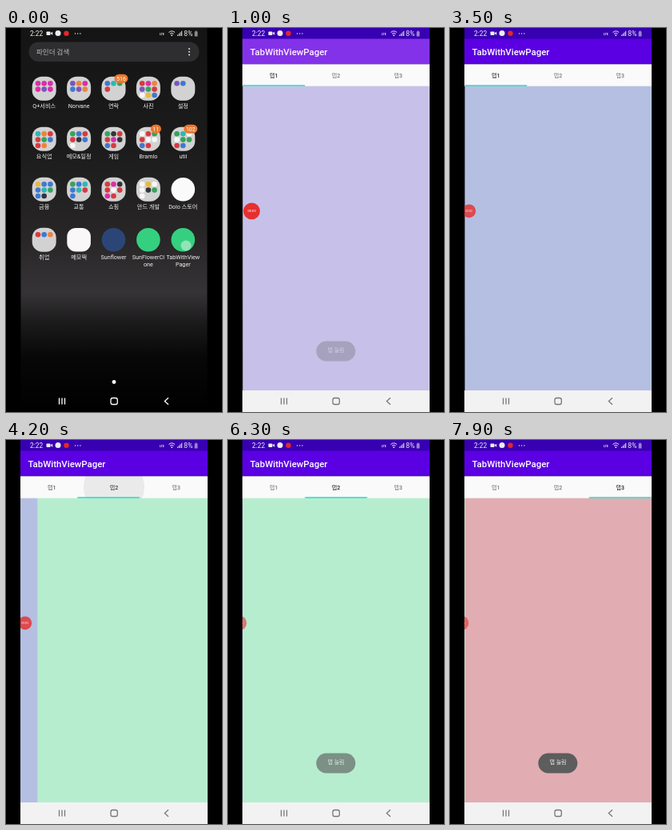
Write an HTML page that moves like this. It is 270 px wide and 480 px high and loops after 8 s.

```html
<!DOCTYPE html>
<html lang="ko">
<head>
<meta charset="utf-8">
<title>TabWithViewPager</title>
<style>
  html, body { margin: 0; width: 100%; height: 100%; overflow: hidden; background: #000; }
  svg { display: block; width: 100vw; height: 100vh; }
  text { font-family: Roboto, "Noto Sans CJK KR", "Noto Sans CJK", sans-serif; }
  .label { font-size: 7.2px; fill: #f2f2f2; text-anchor: middle; }
  .tab { font-size: 7px; font-weight: 500; text-anchor: middle; }
  .mid { text-anchor: middle; }
</style>
</head>
<body>
<svg id="stage" viewBox="0 0 270 480">
  <defs>
    <linearGradient id="wall" x2="0" y2="1">
      <stop offset="0" stop-color="#141415"/>
      <stop offset=".3" stop-color="#1c1b1b"/>
      <stop offset=".55" stop-color="#282627"/>
      <stop offset=".69" stop-color="#353335"/>
      <stop offset=".77" stop-color="#1b1a1b"/>
      <stop offset=".86" stop-color="#070707"/>
      <stop offset="1" stop-color="#000"/>
    </linearGradient>
    <clipPath id="screen"><rect x="18.5" width="233" height="480"/></clipPath>
    <clipPath id="tabRow"><rect x="18.5" y="45.5" width="233" height="27"/></clipPath>
  </defs>
  <rect width="270" height="480"/>
  <g clip-path="url(#screen)">
    <g id="home">
      <rect x="18" width="234" height="480" fill="url(#wall)"/>
      <rect x="28.5" y="17.5" width="213" height="24.5" rx="12.2" fill="#2e2e30"/>
      <text x="38" y="33" font-size="8.5" fill="#b8b8b8">파인더 검색</text>
      <g fill="#ddd"><circle cx="229" cy="26" r="1"/><circle cx="229" cy="29.7" r="1"/><circle cx="229" cy="33.4" r="1"/></g>
      <g id="icons"></g>
      <circle cx="135" cy="442.5" r="2.4" fill="#fff"/>
    </g>
    <circle id="touch" cx="225" cy="272" r="6.5" fill="#dff3e8" opacity="0"/>
    <g id="app" opacity="0">
      <rect x="18" width="234" height="14" fill="#3700b0"/>
      <rect x="18" y="13.5" width="234" height="32" fill="#5a00e2"/>
      <text x="27.5" y="34" font-size="11.45" font-weight="500" fill="#fff">TabWithViewPager</text>
      <g id="pages"></g>
      <rect id="blank" x="18" y="45" width="234" height="409" fill="#fafafa"/>
      <g id="tabs">
        <rect x="18" y="45.3" width="234" height="27.4" fill="#fafafa"/>
        <g id="ripples" clip-path="url(#tabRow)"></g>
        <g id="tabLabels"></g>
        <rect id="indicator" x="18.5" y="71.2" width="77.7" height="1.6" fill="#2cdcc8"/>
      </g>
      <path id="glow" d="M18 13.5h234v32h-234zM18 72.7h234V453h-234z" fill="#ffc8ff" opacity="0"/>
      <rect x="18" y="453" width="234" height="27" fill="#f2f2f2"/>
    </g>
    <g id="badge" opacity="0">
      <g id="badgeBody">
        <circle r="10.4" fill="#e5302f"/>
        <text id="clock" class="mid" y="1.5" font-size="4.2" fill="#fff">00:00</text>
      </g>
    </g>
    <g id="toast" opacity="0">
      <rect x="110.3" y="391.5" width="49" height="25" rx="12.4" fill="#5d5d5d"/>
      <text class="mid" x="135" y="405.3" font-size="7" fill="#eee">탭 눌림</text>
    </g>
    <g id="status" fill="#eee">
      <text x="30" y="10" font-size="8.4">2:22</text>
      <rect x="50.5" y="4.5" width="5" height="4.6" rx=".8"/><path d="M55.5 6.5l2.7-1.8v4.3z"/>
      <circle cx="65" cy="6.6" r="3.5"/>
      <circle cx="75.5" cy="6.7" r="3.2" fill="#e5262b"/>
      <circle cx="86.5" cy="7" r=".7"/><circle cx="89.7" cy="7" r=".7"/><circle cx="92.9" cy="7" r=".7"/>
      <text x="192" y="8.5" font-size="3.6" font-weight="700">LTE</text>
      <g fill="none" stroke="#eee"><path d="M203.5 5.5q3.8-3.3 7.6 0M205 7.3q2.3-1.9 4.6 0"/></g>
      <circle cx="207.3" cy="9.2" r=".9"/>
      <path d="M214 10V8.4h1.1V10zM215.7 10V6.9h1.1V10zM217.4 10V5.3h1.1V10zM219.1 10V3.8h1.1V10z" opacity=".85"/>
      <text x="222.3" y="10" font-size="8.6">8%</text>
      <path d="M235.7 4.4h1v-.8h1.8v.8h1V10.5h-3.8z" opacity=".55"/>
    </g>
    <g id="nav" fill="none" stroke="#fff" stroke-width="1.3">
      <path d="M66.5 462.5v8M70 462.5v8M73.5 462.5v8M203 462.3l-4.6 4.2 4.6 4.2"/>
      <rect x="131" y="462.5" width="8.3" height="8" rx="2.3"/>
    </g>
  </g>
</svg>
<script>
const LOOP = 8000, TAB = 77.7, PAGE = 233;
const $ = id => document.getElementById(id);

function add(parent, tag, attrs, text) {
  const node = document.createElementNS('http://www.w3.org/2000/svg', tag);
  for (const key in attrs) node.setAttribute(key, attrs[key]);
  if (text) node.textContent = text;
  return parent.appendChild(node);
}

// steps: [ms, value, easing towards the next step]
function play(node, prop, steps) {
  const full = [...steps];
  if (full[0][0] > 0) full.unshift([0, full[0][1]]);
  full.push([LOOP, full[full.length - 1][1]]);
  return node.animate(
    full.map(([ms, value, easing = 'linear']) => ({ offset: ms / LOOP, [prop]: value, easing })),
    { duration: LOOP, iterations: Infinity });
}

// Home screen: name, colours of the small icons by row
const dye = { r: '#d83a3f', o: '#f0823c', y: '#e9b93a', g: '#35a45c', t: '#2fb7b5', b: '#3f79d0',
              p: '#7a55c0', m: '#d92fa8', k: '#34353b', w: '#f7f7f7' };
const folders = [
  ['Q+서비스', 'mmm mpm'], ['Norvane', 'pom bpo'], ['연락', 'btg r'], ['사진', 'rmo pgr wyb'], ['설정', 'pb'],
  ['요식업', 'tor rgb ro'], ['메모&일정', 'gbr rkb w'], ['게임', 'gkr rmk br'], ['Bramlo', 'wrg rww br'], ['util', 'gtw wgg rb'],
  ['금융', 'ybb btg bk'], ['교통', 'gbt btr b'], ['쇼핑', 'rmk rwr mr'], ['안드 개발', 'wyw wkg w'], ['Dolo 스토어', '', '#fafafa'],
  ['취업', 'rbo'], ['메모떡', '', '#f8f8f8', 11], ['Sunflower', '', '#2b4577'],
  ['SunFlowerCl/one', '', '#35d07f'], ['TabWithView/Pager', '', '#35d07f']
];
const counts = { 2: '516', 8: '11', 9: '102' };

folders.forEach(([name, rows, plain, round = 15], i) => {
  const x = 47.7 + (i % 5) * 43.4, y = 75.7 + Math.floor(i / 5) * 63;
  const half = plain ? 14.8 : 15;
  add($('icons'), 'rect', { x: x - half, y: y - half, width: 2 * half, height: 2 * half,
    rx: plain ? round : 12.3, fill: plain || '#d2d2d2' });
  rows.split(' ').forEach((row, r) => [...row].forEach((c, k) =>
    add($('icons'), 'circle', { cx: x - 7.7 + k * 7.7, cy: y - 6.5 + r * 7.4, r: 3.3, fill: dye[c] })));
  if (counts[i]) {
    const w = 5 + counts[i].length * 4;
    add($('icons'), 'rect', { x: x + 8.5 - w / 2 + 1, y: y - 18, width: w, height: 11, rx: 5.5, fill: '#e9782f' });
    add($('icons'), 'text', { x: x + 9.5, y: y - 10, 'font-size': 7, fill: '#fff', class: 'mid' }, counts[i]);
  }
  name.split('/').forEach((line, n) =>
    add($('icons'), 'text', { x, y: y + 24.7 + n * 8.5, class: 'label' }, line));
});

// Pages and tabs; each tab is active for one span of time
const spans = [[0, 4100], [4100, 7100], [7100, LOOP]];
['#b5bfe2', '#b7edcf', '#e1adb2'].forEach((fill, i) => {
  add($('pages'), 'rect', { x: 18.5 + i * PAGE, y: 72, width: PAGE + .5, height: 382, fill });
  const label = add($('tabLabels'), 'text',
    { x: 57.3 + i * TAB, y: 61.8, class: 'tab', fill: '#777' }, '탭' + (i + 1));
  const [from, to] = spans[i], on = '#202020', off = '#777';
  const steps = [[0, i ? off : on]];
  if (i) steps.push([from, off], [from + 150, on]);
  if (to < LOOP) steps.push([to, on], [to + 150, off]);
  play(label, 'fill', steps);
});

const glide = 'cubic-bezier(.2,.7,.3,1)';
const slide = width => [0, 1, 2].map(n => `translateX(${n * width}px)`);
for (const [id, width] of [['pages', -PAGE], ['indicator', TAB]]) {
  const [a, b, c] = slide(width);
  play($(id), 'transform', [[0, a], [4000, a, glide], [4400, b], [7000, b, glide], [7400, c]]);
}

[[1, 3900], [2, 6900]].forEach(([i, at]) => {
  const ripple = add($('ripples'), 'circle', { cx: 57.3 + i * TAB, cy: 59, r: 38, fill: '#000', opacity: 0 });
  play(ripple, 'opacity', [[0, 0], [at - 1, 0], [at, .1], [at + 200, .1], [at + 500, 0]]);
  ripple.style.transformOrigin = `${57.3 + i * TAB}px 59px`;
  play(ripple, 'transform', [[0, 'scale(.2)'], [at, 'scale(.2)', 'ease-out'], [at + 300, 'scale(1)']]);
});

// Launch
$('app').style.transformOrigin = '221px 265px';
play($('touch'), 'opacity', [[0, .55], [100, .55], [250, 0]]);
play($('app'), 'opacity', [[0, 0], [250, 0], [500, 1]]);
play($('app'), 'transform', [[0, 'scale(.3)'], [250, 'scale(.3)', 'ease-out'], [600, 'scale(1)']]);
play($('nav'), 'stroke', [[0, '#fff'], [350, '#fff'], [500, '#777']]);
play($('blank'), 'opacity', [[0, 1], [700, 1], [950, 0]]);
play($('tabs'), 'opacity', [[0, 0], [700, 0], [900, 1]]);
play($('glow'), 'opacity', [[0, 0], [500, 0], [800, .25], [1050, .25], [1600, 0]]);

// Toast shown for the first page and after each tab press
play($('toast'), 'opacity', [
  [0, 0], [850, 0], [1350, 1], [2900, 1], [3500, 0],
  [4250, 0], [4700, .97], [6100, .97], [6700, 0],
  [7300, 0], [7800, 1]
]);

// Recorder button docks to the edge, then hides halfway
const dock = (x, scale) => `translate(${x}px, 228.8px) scale(${scale})`;
play($('badge'), 'transform', [
  [0, dock(29.6, 1)], [2600, dock(29.6, 1), 'ease-out'], [3000, dock(23.8, .81)],
  [5000, dock(23.8, .81), 'ease-out'], [5400, dock(14, .9)]
]);
const clock = play($('badge'), 'opacity', [
  [0, 0], [600, 0], [800, 1], [2600, 1], [3000, .82], [5000, .82], [5400, .6]
]);

function tick() {
  const t = (clock.currentTime || 0) % LOOP;
  $('clock').textContent = '00:0' + Math.max(0, Math.floor(t / 1000) - 1);
  requestAnimationFrame(tick);
}
tick();
</script>
</body>
</html>
```
